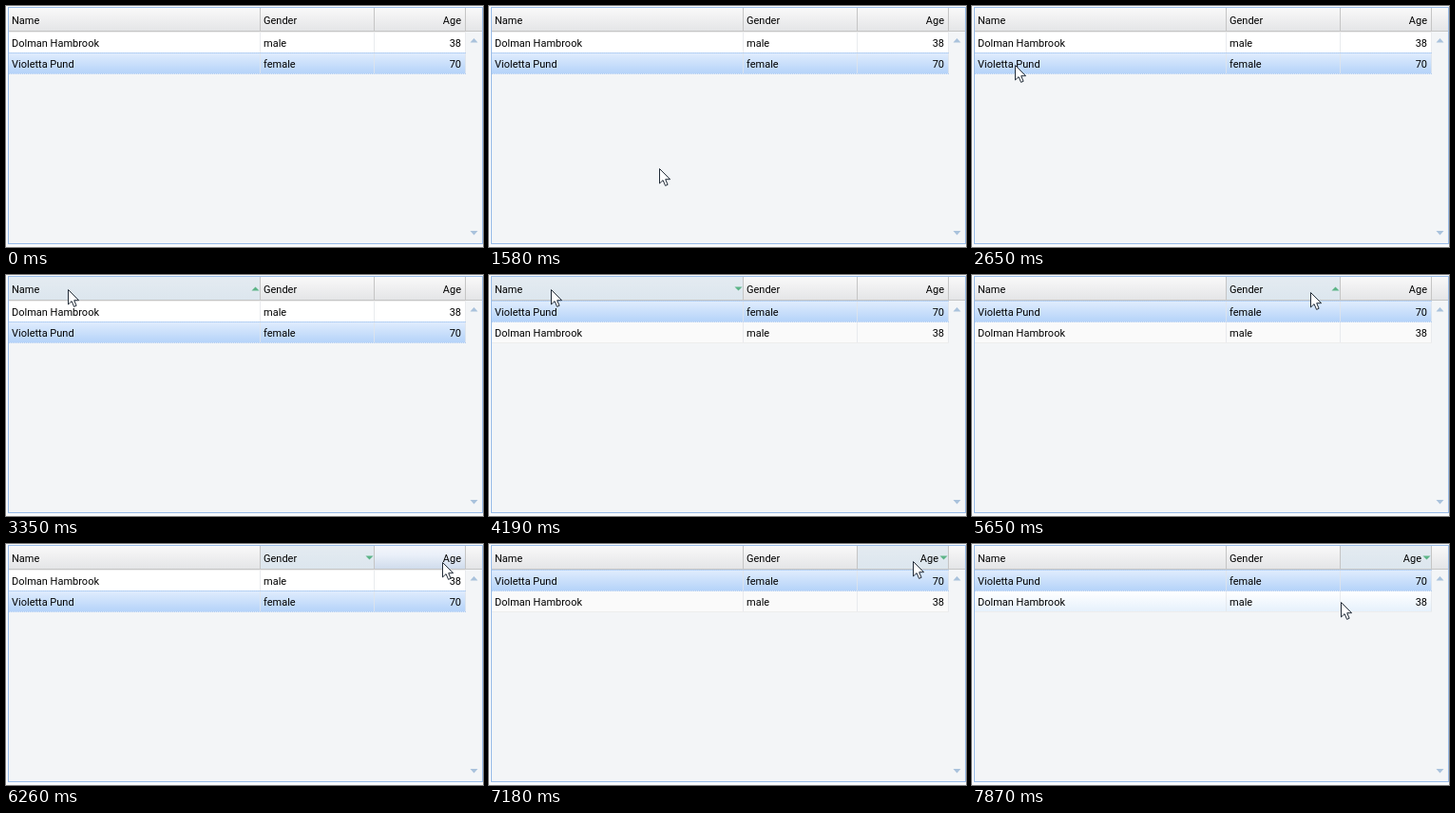
These frames come from a looping animation (502 px wide and 254 px high, 8000 ms). An HTML page:

```html
<!DOCTYPE html>
<html lang="en">
<head>
<meta charset="utf-8">
<title>Sortable grid</title>
<style>
html, body { margin: 0; width: 100%; height: 100%; overflow: hidden; background: #fff; }
#stage { position: relative; width: 502px; height: 254px; overflow: hidden; background: #fafbfc;
  font: 11px/22px Roboto, "Liberation Sans", sans-serif; color: #000; cursor: default; }
#stage div, #stage svg { position: absolute; box-sizing: border-box; }
#grid { left: 2px; top: 1px; width: 500px; height: 250px; border: 1px solid #99bce8; background: #f3f5f7; }
#heads { left: 3px; top: 2px; width: 498px; height: 25px; border-bottom: 1px solid #c5c5c5;
  background: linear-gradient(#f9f9f9, #f0f0f1 45%, #e4e5e7); }
.head { top: 0; height: 24px; border-right: 1px solid #c5c5c5; padding: 3px 4px 0 3px; }
.head.over { background: linear-gradient(#f4f6fb, #eaf0f9 40%, #d0dcec); }
.head.sorted { background: linear-gradient(#e4ebf1, #dce6ee); }
/* neighbouring rows share one border line */
.row { left: 3px; width: 481px; height: 23px; background: #fff; border: solid #ededed; border-width: 1px 0; }
.row.alt { background: #fafafa; }
.row.over { background: linear-gradient(#fff, #e6f1fc); }
.row.picked { z-index: 1; background: linear-gradient(#dfecfd, #b5d3f9); border: dotted #b4cdee; border-width: 1px 0; }
.cell { top: 0; height: 21px; border-right: 1px solid rgba(225, 228, 232, .75); padding: 1px 4px 0 3px; }
.c0 { left: 0; width: 265px; }
.c1 { left: 265px; width: 120px; }
.c2 { left: 385px; width: 96px; text-align: right; }
.c2.sorted { padding-right: 10px; }
#art { left: 0; top: 0; z-index: 2; }
</style>
</head>
<body>
<div id="stage">
  <div id="grid"></div>
  <div id="heads"></div>
  <svg id="art" width="502" height="254">
    <path d="M488.5 38.5h8l-4-4.5z M488.5 237h8l-4 4.5z" fill="#a9c2dc"/>
    <path id="arrow" fill="#5cb487"/>
    <path id="pointer" d="M.5 .5V16l3.6-3.4 2.5 5.8 2.5-1.1-2.4-5.6h4.9z"
      fill="#fff" stroke="#222c38" stroke-linejoin="round"/>
  </svg>
</div>
<script>
const LOOP = 8000, START = 1350, TICK = 76.75;
const ROW_TOP = 27, ROW_STEP = 22;
const stage = document.getElementById("stage");
const headBar = document.getElementById("heads");
const arrow = document.getElementById("arrow");
const pointer = document.getElementById("pointer");

const columns = ["Name", "Gender", "Age"];
const people = [["Dolman Hambrook", "male", 38], ["Violetta Pund", "female", 70]];
const picked = people[1];

// each column is clicked twice: up, then down
const clickTicks = [26, 37, 49, 59, 68, 76];

const entry = { x: 398, y: 255 };
const moves = [
  { from: -1, to: 6, x: 37, y: 116 },
  { from: 12, to: 17, x: 45, y: 62 },
  { from: 17, to: 23, x: 65, y: 15 },
  { from: 37, to: 47, x: 342, y: 15 },
  { from: 49, to: 52, x: 355, y: 22 },
  { from: 54, to: 56, x: 356, y: 18 },
  { from: 59, to: 64, x: 459, y: 19 },
  { from: 68, to: 73, x: 446, y: 18 },
  { from: 76, to: 85, x: 388, y: 61 }
];

const smooth = u => u * u * (3 - 2 * u);
const mix = (a, b, u) => Math.round(a + (b - a) * u);

function add(parent, cls, text = "") {
  const el = document.createElement("div");
  el.className = cls;
  el.textContent = text;
  parent.appendChild(el);
  return el;
}

const heads = columns.map((name, i) => add(headBar, "head c" + i, name));
const rows = people.map(person => {
  const row = add(stage, "row");
  person.forEach((value, i) => add(row, "cell c" + i, value));
  return row;
});

function pointerAt(tick) {
  let spot = entry;
  for (const m of moves) {
    if (tick <= m.from) break;
    const u = smooth(Math.min(1, (tick - m.from) / (m.to - m.from)));
    spot = { x: mix(spot.x, m.x, u), y: mix(spot.y, m.y, u) };
  }
  return spot;
}

function drawHeads(key, dir, { x, y }) {
  heads.forEach((head, i) => {
    const left = 3 + head.offsetLeft, right = left + head.offsetWidth;
    head.classList.toggle("over", y > 2 && y < 26 && x >= left && x < right);
    head.classList.toggle("sorted", i === key);
    if (i === key) arrow.setAttribute("d", `M${right - 9.5} ${14.5 + 2 * dir}h8l-4 ${-4 * dir}z`);
  });
  arrow.style.display = key < 0 ? "none" : "";
}

function drawRows(key, dir, { x, y }) {
  const order = people.slice();
  if (key >= 0) order.sort((a, b) => (a[key] < b[key] ? -dir : dir));
  people.forEach((person, i) => {
    const place = order.indexOf(person);
    const top = ROW_TOP + ROW_STEP * place;
    const list = rows[i].classList;
    rows[i].style.top = top + "px";
    list.toggle("alt", place === 1);
    list.toggle("over", y >= top && y < top + ROW_STEP && x < 484);
    list.toggle("picked", person === picked);
  });
}

function draw(t) {
  const tick = Math.floor((t - START) / TICK + .15);
  const spot = pointerAt(tick);
  pointer.style.display = tick < 0 ? "none" : "";
  pointer.setAttribute("transform", `translate(${spot.x} ${spot.y})`);

  const last = clickTicks.filter(c => tick >= c).length - 1;
  const key = Math.floor(last / 2);
  const dir = last % 2 ? -1 : 1;
  drawHeads(key, dir, spot);
  drawRows(key, dir, spot);
}

function run() {
  draw(performance.now() % LOOP);
  requestAnimationFrame(run);
}
run();
</script>
</body>
</html>
```
